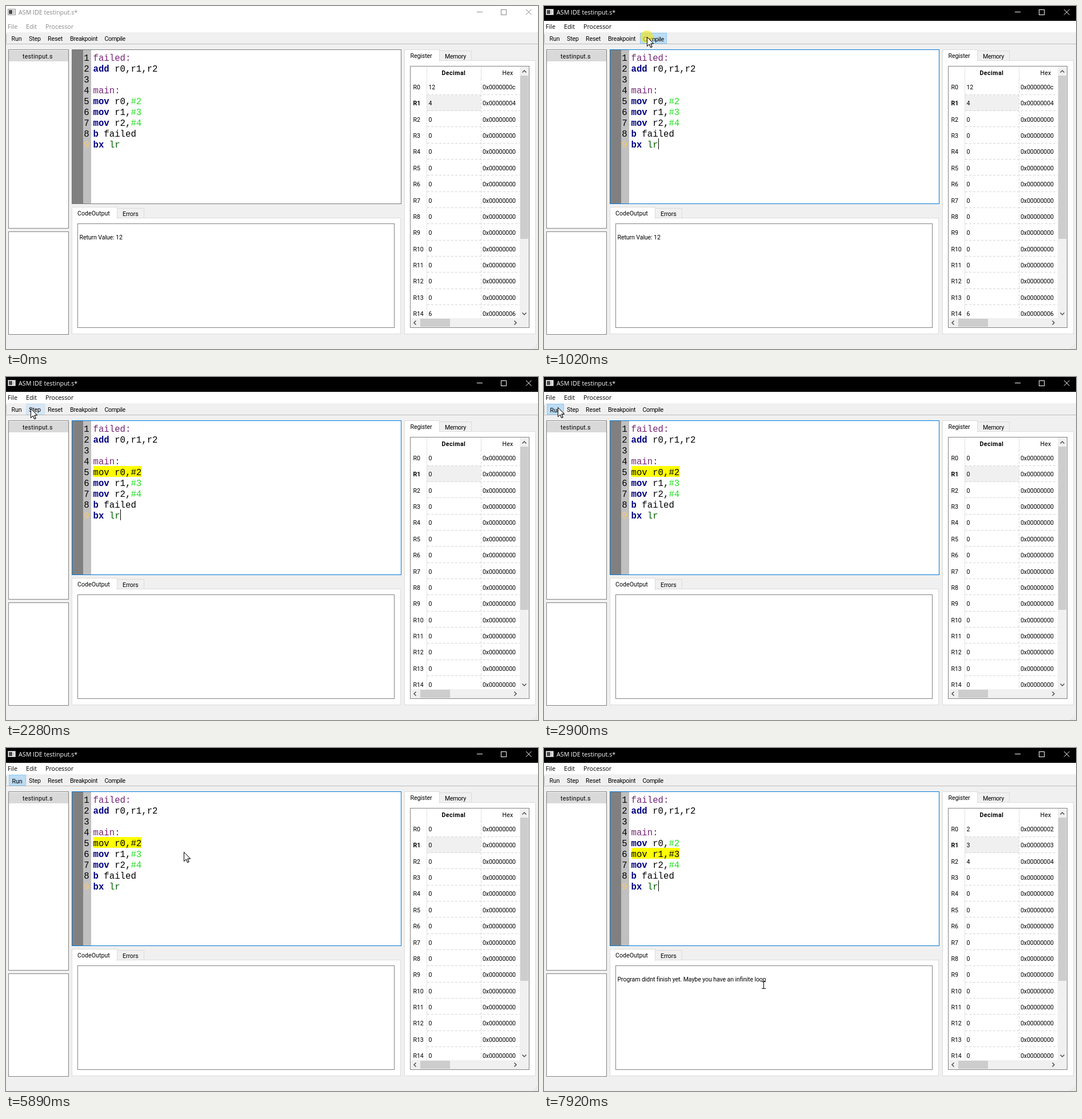
Recreate the animation shown at these times as an HTML page with a canvas. Size 931x601 px, loop 8 s.

```html
<!DOCTYPE html>
<html lang="en">
<head>
<meta charset="utf-8">
<title>ASM IDE</title>
<style>
html, body { margin: 0; width: 100%; height: 100%; overflow: hidden; background: #f0f0f0; }
canvas { display: block; }
</style>
</head>
<body>
<canvas id="stage" width="931" height="601"></canvas>
<script>
const ctx = document.getElementById('stage').getContext('2d');
const LOOP = 8000, STEP = 80;
const UI = 'Roboto, "Liberation Sans", sans-serif';
const TITLE = '"Open Sans", "Noto Sans", sans-serif';
const MONO = '"Liberation Mono", "Noto Sans Mono", monospace';
const GRAY = '#828282', PALE = '#dcdcdc', FACE = '#f0f0f0';

// Moments at which the state of the program changes
const FOCUS = 1020, COMPILED = 1180, RUN = 2830, DONE = 6900;

const CODE = ['failed:', 'add r0,r1,r2', '', 'main:', 'mov r0,#2',
  'mov r1,#3', 'mov r2,#4', 'b failed', 'bx lr'];

const BUTTONS = [
  { label: 'Run', x: 5, w: 30, tx: 9.5 },
  { label: 'Step', x: 35, w: 33, tx: 40 },
  { label: 'Reset', x: 68, w: 39, tx: 73 },
  { label: 'Breakpoint', x: 107, w: 60, tx: 112, track: -0.25 },
  { label: 'Compile', x: 168, w: 47, tx: 172.5, track: -0.4 },
];

// Pointer moves: start time, number of steps, via point, end point
const MOVES = [
  { t: 70, n: 11, via: [330, 190], to: [180, 54] },
  { t: 1570, n: 7, via: [72, 57], to: [26, 56] },
  { t: 2200, n: 2, via: [34, 56], to: [43, 55] },
  { t: 2430, n: 3, via: [33, 54], to: [24, 53] },
  { t: 3290, n: 3, via: [34, 66], to: [47, 83] },
  { t: 4000, n: 4, via: [110, 150], to: [158, 198] },
  { t: 5020, n: 3, via: [192, 198], to: [223, 195] },
  { t: 5650, n: 4, via: [272, 190], to: [311, 182] },
  { t: 7440, n: 7, via: [350, 285], to: [384, 416] },
];
const ENTRY = [800, 640];

function rect(x, y, w, h, fill) {
  ctx.fillStyle = fill;
  ctx.fillRect(x, y, w, h);
}

function box(x, y, w, h, fill, border) {
  rect(x, y, w, h, border);
  rect(x + 1, y + 1, w - 2, h - 2, fill);
}

function text(s, x, y, { color = '#000', font = UI, size = 10.6, weight = 400, track = -0.1 } = {}) {
  ctx.font = `${weight} ${size}px ${font}`;
  ctx.letterSpacing = track + 'px';
  ctx.fillStyle = color;
  ctx.fillText(s, x, y);
}

function path(points, color, width = 1, close = false) {
  ctx.beginPath();
  points.forEach(([x, y]) => ctx.lineTo(x, y));
  if (close) ctx.closePath();
  ctx.strokeStyle = color;
  ctx.lineWidth = width;
  ctx.stroke();
}

function dashed(points) {
  ctx.setLineDash([4, 3]);
  path(points, '#d4d4d4');
  ctx.setLineDash([]);
}

function pointerAt(t) {
  if (t < MOVES[0].t) return null;
  let pos = ENTRY;
  for (const { t: start, n, via, to } of MOVES) {
    if (t < start) break;
    const p = Math.min(n, Math.floor((t - start + 10) / STEP) + 1) / n;
    const u = 1 - p;
    const from = pos;
    pos = [0, 1].map(i => u * u * from[i] + 2 * u * p * via[i] + p * p * to[i]);
    if (p < 1) break;
  }
  return pos;
}

function inside([x, y], l, t, r, b) {
  return x >= l && x < r && y >= t && y < b;
}

function drawTitle(active) {
  const ink = active ? '#fff' : '#888';
  rect(0, 0, 931, 26, active ? '#000' : '#fff');
  rect(0, 26, 931, 20, '#fff');
  box(3, 5, 14, 11, '#fff', '#8c8c8c');
  rect(5, 7, 6, 7, '#4a4a4a');
  rect(12, 7, 3, 7, '#c8c8c8');
  text('ASM IDE testinput.s*', 22, 15, { font: TITLE, size: 10.7, track: 0, color: ink });

  path([[824, 10.5], [834, 10.5]], ink);
  ctx.strokeRect(866.5, 6.5, 9, 9);
  path([[910, 6], [919.5, 15.5]], ink);
  path([[919.5, 6], [910, 15.5]], ink);

  const menu = { font: TITLE, size: 10.7, track: 0, color: active ? '#000' : '#888' };
  text('File', 3, 40, menu);
  text('Edit', 35, 40, menu);
  text('Processor', 69, 40, menu);
}

function drawToolbar(pressed, hovered) {
  rect(0, 66, 931, 1, '#bdbdbd');
  for (let y = 50; y < 63; y += 3) rect(0, y, 1, 2, '#a8a8a8');
  for (const { label, x, w, tx, track } of BUTTONS) {
    const down = label === pressed;
    if (down) box(x, 47, w, 19, '#bcdcf4', '#90c8f6');
    else if (label === hovered) box(x, 47, w, 19, '#d8e6f2', '#c0dcf3');
    const shift = down ? 1 : 0;
    text(label, tx + shift, 61 + shift, { track });
  }
}

function drawFiles() {
  box(4, 76, 106, 314, '#fff', GRAY);
  rect(5, 78, 104, 19, '#d9d9d9');
  text('testinput.s', 29, 92, { track: 0.25 });
  box(4, 395, 106, 181, '#fff', GRAY);
}

function tokens(line) {
  if (line.endsWith(':')) return [[line, '#742474', 400]];
  return line.split(/(#\d|\s|,)/).map((part, i) => {
    if (i === 0) return [part, '#00007f', 700];
    if (part[0] === '#') return [part, '#1fe01f', 400];
    return [part, part === 'lr' ? '#006400' : '#000', 400];
  });
}

function drawEditor(active, marked, caret) {
  box(115, 76, 577, 271, '#fff', active ? '#0078d7' : '#7a7a7a');
  rect(116, 77, 19, 269, '#808080');
  rect(135, 77, 14, 269, '#c0c0c0');
  const mono = { font: MONO, size: 15.7, track: 0 };
  const advance = 9.42;
  CODE.forEach((line, i) => {
    const top = 80 + 19 * i, base = top + 16;
    text(String(i + 1), 136.2, base, { ...mono, color: i === 8 ? '#ffc864' : '#000' });
    if (i + 1 === marked) {
      rect(153, top, line.length * advance, 19, '#ff0');
      text(line, 152.5, base, mono);
      return;
    }
    let col = 0;
    for (const [part, color, weight] of tokens(line)) {
      text(part, 152.5 + col * advance, base, { ...mono, color, weight });
      col += part.length;
    }
  });
  if (caret) rect(200, 232, 1, 19, '#000');
}

function drawTabs(x, y, first, second, paneRight, paneBottom) {
  const bottom = y + 19;
  box(x, bottom, paneRight - x, paneBottom - bottom, '#fff', PALE);
  box(second.x, y + 2, second.w, 18, FACE, PALE);
  box(x, y, second.x - x + 1, 21, '#fff', PALE);
  rect(x + 1, bottom, second.x - x - 1, 3, '#fff');
  text(first.label, first.tx, y + 14.5, { track: first.track });
  text(second.label, second.tx, y + 15.5, { track: second.track });
}

function drawOutput(message) {
  drawTabs(115, 352, { label: 'CodeOutput', tx: 125, track: 0.05 },
    { label: 'Errors', x: 194, w: 48, tx: 204 }, 691, 575);
  box(125, 381, 555, 183, '#fff', GRAY);
  text(message, 128.5, 409);
}

function arrow(x, y, dx, dy) {
  const tip = [x + dx * 2, y + dy * 2];
  const a = [x - dx * 1.5 - dy * 3.5, y - dy * 1.5 - dx * 3.5];
  const b = [x - dx * 1.5 + dy * 3.5, y - dy * 1.5 + dx * 3.5];
  path([a, tip, b], '#505050', 1.5);
}

function drawRegisters(values) {
  drawTabs(697, 76, { label: 'Register', tx: 707.5 },
    { label: 'Memory', x: 758, w: 57, tx: 768, track: -0.35 }, 927, 575);
  box(707, 105, 209, 459, '#fff', GRAY);
  text('Decimal', 762.5, 121, { weight: 700, track: 0.45 });
  text('Hex', 868.5, 121, { track: 0.2 });

  ctx.save();
  ctx.beginPath();
  ctx.rect(708, 106, 191, 441);
  ctx.clip();
  const pitch = 28.36;
  rect(736, 156, 95, 28, FACE);
  for (let i = 0; i < 15; i++) {
    const base = Math.round(142 + pitch * i) + 4;
    const value = values[i] || 0;
    text('R' + i, 712.5, base, { weight: i === 1 ? 700 : 400 });
    text(String(value), 739.5, base);
    text('0x' + value.toString(16).padStart(8, '0'), 834, base);
    const y = Math.floor(155 + pitch * i) + 0.5;
    dashed([[737, y], [899, y]]);
  }
  rect(736, 106, 1, 441, '#e2e2e2');
  rect(831, 106, 1, 21, '#e2e2e2');
  dashed([[831.5, 127], [831.5, 547]]);
  ctx.restore();

  rect(899, 106, 16, 441, FACE);
  rect(900, 122, 14, 286, '#cdcdcd');
  arrow(907, 115, 0, -1);
  arrow(907, 539, 0, 1);
  rect(708, 547, 207, 16, FACE);
  rect(725, 548, 52, 14, '#cdcdcd');
  arrow(716, 555, -1, 0);
  arrow(891, 555, 1, 0);
}

function drawGrip() {
  for (let i = 0; i < 3; i++) {
    for (let j = 0; j <= i; j++) rect(928 - 3 * j, 593 + 3 * i, 1, 1, '#bfbfbf');
  }
}

function drawHalo([x, y]) {
  ctx.fillStyle = 'rgba(240, 228, 30, 0.65)';
  ctx.beginPath();
  ctx.arc(x, y, 11, 0, Math.PI * 2);
  ctx.fill();
}

function drawPointer([x, y], beam) {
  ctx.save();
  ctx.translate(Math.round(x), Math.round(y));
  if (beam) {
    rect(0, -6, 1, 12, '#000');
    for (const edge of [-7, 5]) {
      rect(-3, edge, 3, 1, '#000');
      rect(1, edge, 3, 1, '#000');
    }
  } else {
    ctx.translate(0.5, 0.5);
    ctx.fillStyle = '#fff';
    const shape = [[0, 0], [0, 16], [3.8, 12.4], [6.2, 18], [8.6, 17], [6.2, 11.5], [11, 11.3]];
    path(shape, '#000', 1, true);
    ctx.fill();
    path(shape, '#000', 1, true);
  }
  ctx.restore();
}

function caretOn(t) {
  return [[FOCUS, 1570], [2050, 2590], [7050, 7520], [7920, LOOP]]
    .some(([a, b]) => t >= a && t < b);
}

function registersAt(t) {
  if (t < COMPILED) return { 0: 12, 1: 4, 14: 6 };
  return t < DONE ? {} : { 0: 2, 1: 3, 2: 4 };
}

function outputAt(t) {
  if (t < COMPILED) return 'Return Value: 12';
  return t < DONE ? '' : 'Program didnt finish yet. Maybe you have an infinite loop';
}

function draw(t) {
  const active = t >= FOCUS;
  const busy = t >= RUN && t < DONE;
  const pointer = pointerAt(t);
  const compiling = active && t < COMPILED;
  const pressed = compiling ? 'Compile' : busy ? 'Run' : '';
  const over = pointer && BUTTONS.find(b => inside(pointer, b.x, 47, b.x + b.w, 66));
  const hovered = over && !busy ? over.label : '';
  const marked = t < COMPILED ? 0 : t < DONE ? 5 : 6;

  rect(0, 0, 931, 601, FACE);
  drawTitle(active);
  drawToolbar(pressed, hovered);
  drawFiles();
  drawEditor(active, marked, caretOn(t));
  drawOutput(outputAt(t));
  drawRegisters(registersAt(t));
  drawGrip();

  if (!pointer) return;
  if (compiling || (t >= RUN && t < 2900)) drawHalo(pointer);
  const overText = inside(pointer, 149, 77, 691, 346) || inside(pointer, 126, 382, 679, 563);
  drawPointer(pointer, overText && !busy);
}

const start = performance.now();
function tick() {
  draw((performance.now() - start) % LOOP);
  requestAnimationFrame(tick);
}
tick();
</script>
</body>
</html>
```
